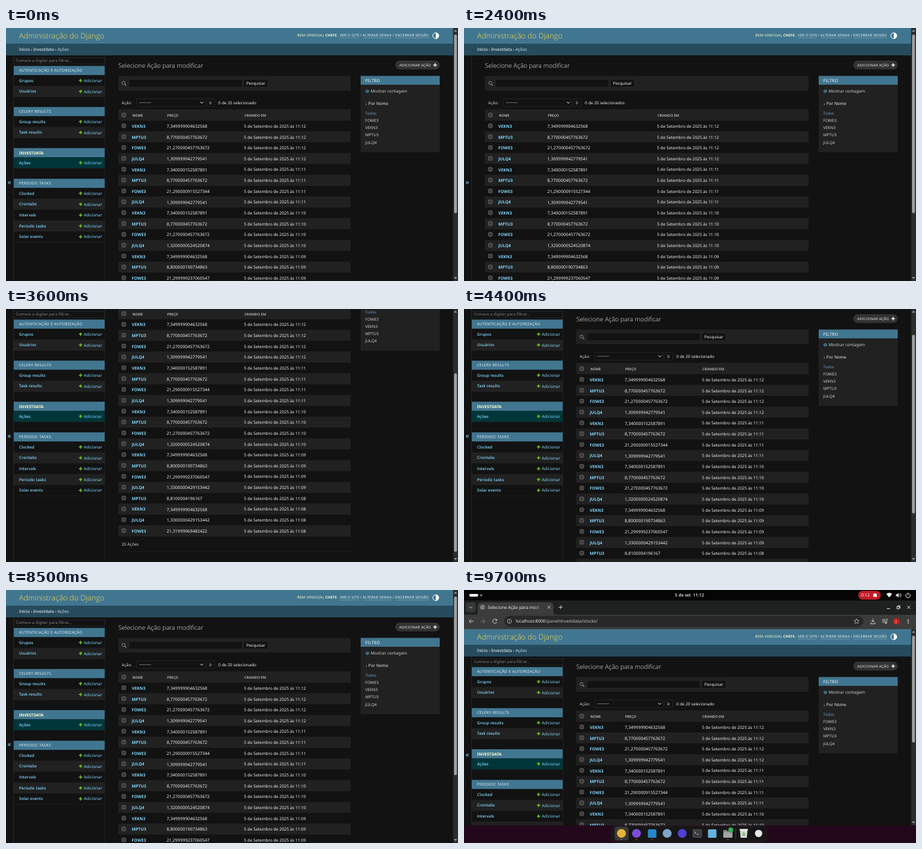
These frames come from a looping animation (692 px wide and 388 px high, 9.9 s). An HTML page:

```html
<!DOCTYPE html>
<html lang="pt-BR">
<head>
<meta charset="utf-8">
<title>Ações</title>
<style>
html, body { margin: 0; width: 100%; height: 100%; overflow: hidden; background: #121212; }
#stage { display: block; width: 100vw; height: 100vh; }
text { font-family: "Noto Sans", "Open Sans", sans-serif; text-rendering: geometricPrecision; white-space: pre; }
.light { font-family: "Open Sans", "Noto Sans", sans-serif; font-weight: 300; }
.semi { font-family: "Open Sans", "Noto Sans", sans-serif; font-weight: 600; }
</style>
</head>
<body>
<svg id="stage" viewBox="0 0 692 388"></svg>
<script>
const LOOP = 9900, MAX_SCROLL = 126.5, ROW = 16.65;
const C = {
  body: '#121212', dark: '#212121', line: '#272727', border: '#353535',
  head: '#417690', crumb: '#264b5d', link: '#81d4fa', fg: '#eeeeee', quiet: '#d0d0d0'
};

// Text is placed by its left edge and vertical centre.
const text = (x, y, s, size = 6.3, fill = C.fg, extra = '') =>
  `<text x="${x}" y="${(y + size * .36).toFixed(2)}" font-size="${size}" fill="${fill}" ${extra}>${s}</text>`;
const rect = (x, y, w, h, fill, extra = '') =>
  `<rect x="${x}" y="${y}" width="${w}" height="${h}" fill="${fill}" ${extra}/>`;
const disc = (x, y, r, fill, extra = '') =>
  `<circle cx="${x}" cy="${y}" r="${r}" fill="${fill}" ${extra}/>`;
const line = (d, stroke, w = .8, extra = '') =>
  `<path d="${d}" fill="none" stroke="${stroke}" stroke-width="${w}" ${extra}/>`;
const group = (id, body) => `<g id="${id}">${body}</g>`;
const BOLD = 'font-weight="700"', SEMI = 'class="semi"', LIGHT = 'class="light"', CAPS = 'letter-spacing=".25"';

const STOCKS = ['VEKN3', 'MPTU3', 'FOWE3', 'JULQ4'];
const PRICES = [
  '7,349999904632568', '8,770000457763672', '21,270000457763672', '1,309999942779541',
  '7,340000152587891', '8,770000457763672', '21,290000915527344', '1,309999942779541',
  '7,340000152587891', '8,770000457763672', '21,270000457763672', '1,3200000524520874',
  '7,349999904632568', '8,800000190734863', '21,299999237060547', '1,3300000429153442',
  '8,8100004196167', '7,349999904632568', '1,3300000429153442', '21,31999969482422'
];
const LAST_ORDER = [1, 0, 3, 2];

function header() {
  const user = (x, s, fill = '#f2f5f7', extra = '') => text(x, 11.5, s, 5.4, fill, CAPS + ' ' + extra);
  const under = (a, b) => line(`M${a} 15.2H${b}`, '#a9c3cf', .4);
  return rect(0, 0, 692, 24, C.head) + rect(0, 24, 692, 18, C.crumb) +
    text(20, 12, 'Administração do Django', 11.6, '#f5dd5d', LIGHT) +
    user(446, 'BEM-VINDO(A),', '#ffffcc') + user(488.7, 'CHEFE.', '#ffffcc', BOLD) +
    user(511, 'VER O SITE') + user(542, '/', '#ffffcc') +
    user(546, 'ALTERAR SENHA') + user(592, '/', '#ffffcc') + user(596, 'ENCERRAR SESSÃO') +
    under(511, 540) + under(546, 590.5) + under(596, 648) +
    disc(658, 11.8, 4.5, 'none', 'stroke="#fff" stroke-width="1"') +
    '<path d="M658 7.3a4.5 4.5 0 0 1 0 9z" fill="#fff"/>' +
    text(20, 33, `Início › Investdata › <tspan fill="#c4dce8">Ações</tspan>`, 6.4, '#fff');
}

function sidebar() {
  const sections = [
    [58.2, 'AUTENTICAÇÃO E AUTORIZAÇÃO', ['Grupos', 'Usuários']],
    [121.2, 'CELERY RESULTS', ['Group results', 'Task results']],
    [184.2, 'INVESTDATA', ['Ações']],
    [231.2, 'PERIODIC TASKS', ['Clocked', 'Crontabs', 'Intervals', 'Periodic tasks', 'Solar events']]
  ];
  let s = rect(0, 42, 152, 400, C.body) +
    rect(12, 45.3, 139, 9.8, C.body, `stroke="${C.border}" stroke-width=".5"`) +
    text(15, 50, 'Comece a digitar para filtrar...', 6.2, '#858585');
  for (const [top, name, items] of sections) {
    const current = name === 'INVESTDATA';
    s += rect(12, top, 139, 14.2, C.head) +
      text(20, top + 7.1, name, current ? 6.2 : 5.9, current ? '#ffffcc' : '#e4edf1', current ? BOLD : CAPS);
    items.forEach((item, i) => {
      const y = top + 14.2 + i * ROW, mid = y + 8.2;
      s += rect(12, y, 139, ROW, current ? '#00363a' : i % 2 ? C.dark : C.body) +
        line(`M12 ${y + ROW}H151`, C.line, .5) +
        text(20, mid, item, 6.2, C.link, SEMI) +
        line(`M111.6 ${mid}h5.2m-2.6 -2.6v5.2`, '#70bf2b', 1.5) +
        text(119, mid, 'Adicionar', 6.3, C.link);
    });
  }
  return s + line('M151.5 42V442', C.line, .6);
}

const toggle = arrow => rect(0, 42, 12, 400, C.body) + line('M11.5 42V442', C.border, .6) +
  text(2.3, 236, arrow, 11, C.link, 'data-arrow=""');

function checkbox(x, y) {
  return rect(x - 2.9, y - 2.9, 5.8, 5.8, '#3b3b3b', 'rx="1" stroke="#858585" stroke-width=".6"');
}

function list(x, price, date, counter) {
  const name = x + 21, width = 527.5 - x;
  const box = 'stroke="#353535" stroke-width=".5" rx="1.5"';
  let s = text(x, 58, 'Selecione Ação para modificar', 9.65, C.fg, LIGHT) +
    rect(x, 73.5, width, 22.5, C.dark) +
    disc(x + 8, 84.3, 2.4, 'none', 'stroke="#8a8a8a" stroke-width=".9"') +
    line(`M${x + 9.8} 86.1l2.4 2.4`, '#8a8a8a', 1.1) +
    rect(x + 16.3, 78.8, 173.4, 12, C.body, box) +
    rect(x + 191.8, 78.8, 37.2, 12, C.body, box) + text(x + 196, 84.8, 'Pesquisar', 6.3) +
    text(x + 5, 114.5, 'Ação:', 6.2, C.quiet) +
    rect(x + 28, 108.5, 105, 12, C.body, box) + text(x + 32, 114.2, '---------', 6.3) +
    line(`M${x + 125.5} 113.3l2.2 2.3 2.2 -2.3`, C.fg, 1) +
    rect(x + 135.2, 108.5, 12.3, 12, C.body, box) + text(x + 139, 114.5, 'Ir', 6.2, C.quiet) +
    text(x + 153, 114.3, counter, 6.25) +
    rect(x, 125, width, 17, C.dark) + line(`M${x} 125.2H527.5M${x} 142H527.5`, C.line, .6) +
    checkbox(x + 8.3, 133.5);
  [[name + .5, 'NOME'], [price + .7, 'PREÇO'], [date + .7, 'CRIANDO EM']].forEach(([cx, label]) => {
    s += text(cx, 134.2, label, 5.25, C.quiet, SEMI);
  });
  PRICES.forEach((value, i) => {
    const y = 142.1 + i * ROW, mid = y + 8.5;
    const stock = STOCKS[i < 16 ? i % 4 : LAST_ORDER[i - 16]];
    s += rect(x, y, width, ROW, i % 2 ? C.dark : C.body) +
      line(`M${x} ${y + ROW}H527.5`, C.line, .5) +
      checkbox(x + 8.3, mid - .6) +
      text(name - .5, mid, stock, 6.4, C.link, BOLD) +
      text(price, mid, value, 6.6) +
      text(date, mid, `5 de Setembro de 2025 às 11:${String(12 - Math.floor(i / 4)).padStart(2, '0')}`, 6.35);
  });
  return s + text(x + 5, 487.5, '20 Ações', 6.3, C.quiet) + line(`M${x} 498.5H527.5`, C.line, .6);
}

function tools() {
  let s = rect(596, 50, 68, 13.4, '#333', 'rx="6.7"') +
    text(602, 56.7, 'ADICIONAR AÇÃO', 5.4, C.fg, CAPS) + line('M654.3 56.7h5.4m-2.7 -2.7v5.4', C.fg, 1.5) +
    rect(543, 73.5, 121, 117, C.dark) + rect(543, 73.5, 121, 13.5, C.head) +
    text(550, 80.4, 'FILTRO', 6.4, '#fff', CAPS) +
    '<path d="M550 97q3.2 -5.4 6.4 0q-3.2 5.4 -6.4 0z" fill="#417690"/>' + disc(553.2, 97, .7, C.dark) +
    text(558.3, 97, 'Mostrar contagem', 6.4, C.quiet) + text(550, 115.5, '↓ Por Nome', 6.4);
  ['Todos', STOCKS[2], STOCKS[0], STOCKS[1], STOCKS[3]].forEach((item, i) => {
    s += text(550, 130.9 + i * 11.1, item, 6.1, i ? C.quiet : '#6f94c6');
  });
  return s;
}

function desktop() {
  const icon = '#d5d5d5';
  const bar = rect(0, 0, 692, 16, '#050505') +
    rect(8, 6, 14, 4.2, '#f2f2f2', 'rx="2.1"') + disc(26.3, 8.1, 1.8, '#777') +
    text(323, 7.8, '5 de set  11:12', 6.5, '#f2f2f2', SEMI) +
    rect(603.5, 1.3, 34.5, 13.4, '#c01c28', 'rx="6.7"') +
    `<g id="clock">${text(608, 7.9, '', 6.6, '#fff')}</g>` + rect(626.7, 5.4, 5.2, 5.2, '#fff', 'rx=".6"') +
    '<path d="M646.6 6q4.4 -3.6 8.8 0l-4.4 5.4z" fill="#f2f2f2"/>' +
    '<path d="M661.4 6.6h1.7l2.3 -2v7l-2.3 -2h-1.7z" fill="#f2f2f2"/>' +
    line('M666.7 6q1.6 2 0 4.2M668.2 4.9q2.4 3.2 0 6.4', '#f2f2f2', .7) +
    line('M677.9 5.5a3.4 3.4 0 1 0 3.6 0M679.7 4v4', '#f2f2f2', 1);
  const tabs = rect(0, 16, 692, 22, '#1f2020') +
    rect(3, 19, 15, 15, '#353636', 'rx="4"') + line('M8.3 25.5l2.2 2.2 2.2 -2.2', icon, 1) +
    '<path d="M18 38q3 0 3 -4v-9q0 -6 6 -6h104q6 0 6 6v9q0 4 3 4z" fill="#3c3c3c"/>' +
    disc(28.3, 26.4, 3.7, '#85888c') + line('M25 25.3h4l1 2 2 -.5M27 29.5l1 -2', '#4c4f52', .7) +
    text(36.3, 26.4, 'Selecione Ação para mo<tspan fill="#aaa">d</tspan><tspan fill="#777">i</tspan>', 6.6, '#eee') +
    line('M128 24.2l4.4 4.4m0 -4.4l-4.4 4.4M145 26.4h6m-3 -3v6', icon, .9) +
    line('M647.3 28.6h5M662.8 25.4h3.5v3.5h-3.5zM664 25.4v-1.3h3.6v3.6h-1.3M678.6 24.2l4.6 4.6m0 -4.6l-4.6 4.6', '#eee', .9);
  const dots = [-2.6, 0, 2.6].map(d => disc(680, 48 + d, .9, icon)).join('');
  const address = rect(0, 38, 692, 22, '#3c3c3c') +
    line('M14.5 48h-6.5m3 -3l-3 3 3 3', icon, .9) + line('M25.7 48h6.5m-3 -3l3 3 -3 3', '#838383', .9) +
    line('M50 46.2a3.2 3.2 0 1 0 .3 2.8M50.3 44.5v2.2h-2.2', icon, .9) +
    rect(61.5, 39.6, 550, 16.8, '#282828', 'rx="8.4"') +
    disc(69.5, 48, 3.2, 'none', `stroke="${icon}" stroke-width=".7"`) + line('M69.5 47.5v2.2M69.5 46v.7', icon, .7) +
    text(79.3, 47.8, 'localhost:8000<tspan fill="#c4c7c5">/panel/investdata/stocks/</tspan>', 6.7, '#f0f0f0') +
    line('M601 44l1.2 2.5 2.7 .3 -2 1.9 .5 2.7 -2.4 -1.3 -2.4 1.3 .5 -2.7 -2 -1.9 2.7 -.3z', icon, .7) +
    line('M626 44v5m-2.3 -2.3l2.3 2.3 2.3 -2.3M622.8 49.5v2.3h6.4v-2.3', icon, .9) +
    line('M640.5 45.3h5M640.5 47.5h5M640.5 49.7h2.6M647 50.3v-5.5h1.8', icon, .9) + disc(645.8, 50.3, 1.4, icon) +
    disc(662, 48, 5, '#c5221f') + text(660.9, 48, 'J', 5.5, '#fff') + dots;
  return bar + tabs + address;
}

function dock() {
  const apps = [[241, '#e2b53a'], [264, '#7c4ddb'], [288, '#2489ca'], [311, '#7fa6c9'], [334, '#5140d8'], [380, '#62b3dc'], [451, '#e8e8e8']];
  return rect(226, 362, 237, 24.5, '#171516', 'rx="7" stroke="#2e2b2d" stroke-width=".6"') +
    rect(230.5, 363, 21.5, 21, '#3a3839', 'rx="4"') +
    apps.map(([x, fill]) => x === 288 || x === 380 ?
      rect(x - 6.5, 367, 13, 13, fill, 'rx="1.5"') : disc(x, 373.3, x === 451 ? 5.6 : 6.8, fill)).join('') +
    rect(350.3, 367.3, 13.6, 12.3, '#3b3d40', 'rx="1.5" stroke="#67696c" stroke-width=".5"') +
    line('M353 370.5l2 1.7 -2 1.7M356.3 374.5h3', '#ddd', .8) +
    '<path d="M397 368h5l1.5 1.8h7.5v10h-14z" fill="#858585"/>' + rect(397, 371.5, 14, 8.3, '#a4a4a4', 'rx="1"') +
    disc(408.4, 368, 4, '#26a548') + text(406.9, 368, '1', 5, '#fff') +
    line('M415.8 365.5V382.5', '#555', .6) +
    '<path d="M422.5 368h11.5l-1 12h-9.5z" fill="#d8ddd6"/>' + rect(421.8, 366.5, 13, 2.2, '#f0f0ee', 'rx=".8"') +
    line('M426 374.5l2.2 -3 2.2 3zM425.8 376.5h5', '#5b9a62', .9) +
    [241, 264, 288, 404].map(x => disc(x, 382.8, .9, '#e95420')).join('');
}

const stage = document.getElementById('stage');
stage.innerHTML = rect(0, 0, 692, 388, '#22081a') +
  `<svg id="view" x="0" width="692" overflow="hidden">` + rect(0, 0, 692, 600, C.body) +
  group('page', header() + tools() +
    group('wide', list(32, 127.5, 295.5, '0 de 20 selecionados')) +
    group('narrow', list(172, 246, 364.3, '0 de 20 selecionado'))) +
  group('side', group('opened', sidebar() + toggle('«')) + group('closed', toggle('»'))) +
  rect(684.5, 0, 8, 388, '#2c2c2c') + '<path d="M685.8 5.6l2.4 -3 2.4 3z" fill="#9f9f9f"/>' +
  rect(686, 10, 4.4, 274, '#9f9f9f', 'id="thumb" rx="2.2"') +
  '<path id="down" d="M685.8 0l2.4 3 2.4 -3z" fill="#9f9f9f"/></svg>' +
  group('top', desktop()) + group('dock', dock());

const el = id => document.getElementById(id);
const show = (id, on) => el(id).setAttribute('display', on ? 'inline' : 'none');
const move = (id, y) => el(id).setAttribute('transform', `translate(0 ${y.toFixed(2)})`);
const clock = el('clock').firstElementChild;
const arrows = stage.querySelectorAll('[data-arrow]');

function ease(t, from, to) {
  const p = Math.min(1, Math.max(0, (t - from) / (to - from)));
  return p * p * (3 - 2 * p);
}

function draw(t) {
  const open = t < 500 || t >= 2500;
  const scroll = MAX_SCROLL * ease(t, 3130, 3580) -
    (MAX_SCROLL - 42) * ease(t, 4050, 4400) - 42 * ease(t, 4450, 4900);
  const windowed = ease(t, 8650, 9000);
  const height = 388 - 87 * windowed;

  show('narrow', open);
  show('opened', open);
  show('wide', !open);
  show('closed', !open);
  move('page', -scroll);
  move('side', -Math.min(scroll, 42));

  el('view').setAttribute('y', 60 * windowed);
  el('view').setAttribute('height', height);
  el('thumb').setAttribute('y', 10 + scroll * .7);
  el('thumb').setAttribute('height', 274 - 110 * windowed);
  move('down', height - 6);
  // The arrow stays centred in the visible height.
  for (const arrow of arrows) arrow.setAttribute('dy', (height - 388) / 2);

  show('top', windowed > 0);
  show('dock', windowed > 0);
  move('top', -60 * (1 - windowed));
  move('dock', 28 * (1 - windowed));
  clock.textContent = t < 9500 ? '0:11' : '0:12';
}

function tick() {
  draw(performance.now() % LOOP);
  requestAnimationFrame(tick);
}
tick();
</script>
</body>
</html>
```
